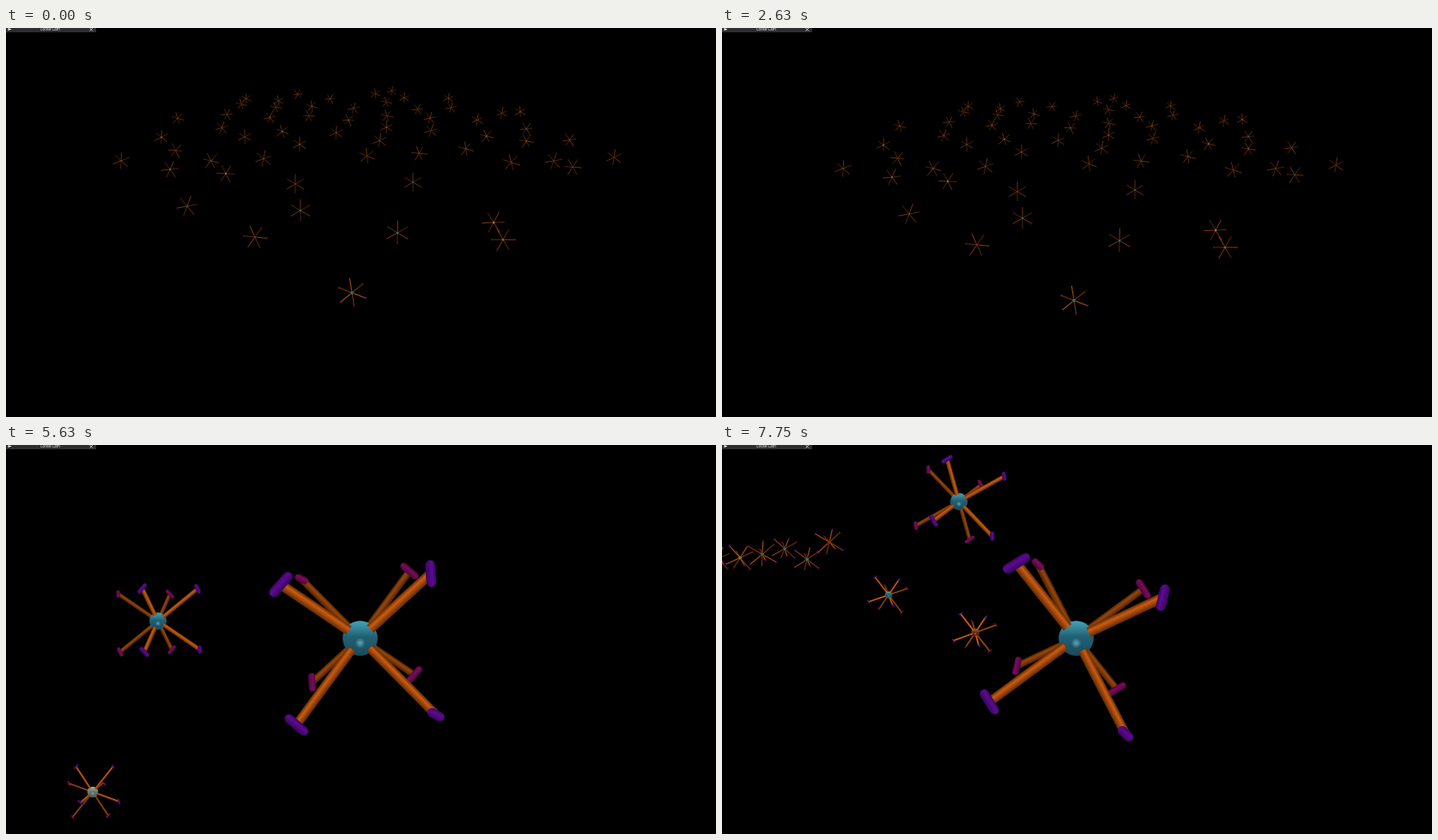
Recreate the animation shown at these times as an HTML page with a canvas. Size 827 by 454 pixels, loop 8000 ms.

```html
<!DOCTYPE html>
<html lang="en">
<head>
<meta charset="utf-8">
<title>Star field</title>
<style>
html, body { margin: 0; width: 100%; height: 100%; overflow: hidden; background: #000; }
canvas { display: block; }
</style>
</head>
<body>
<canvas id="stage" width="827" height="454"></canvas>
<script>
const ctx = document.getElementById('stage').getContext('2d');
const LOOP = 8000, TICK = 125, CUT = 5625, SWARM = 6000, RAD = Math.PI / 180;
const TEAL = '#338aa2', GREEN = '#3f8048', PALE = '#a3ad90', YELLOW = '#a8873a', RED = '#a0341c';
const BALLS = [TEAL, TEAL, RED, PALE, YELLOW, GREEN];

// Each diagonal carries two opposite arms, each ending in a crossbar
const DIAGONALS = [
  { arm: [1, 1, 1], bar: [1, 1, -2] },
  { arm: [-1, -1, 1], bar: [1, -1, 0] },
  { arm: [-1, 1, 1], bar: [1, 1, 0] },
  { arm: [1, -1, 1], bar: [0, 1, 1] }
];

// Nearest stars: place before the turn, place after it, roll
const NEAR = [
  [403, 309, 451, 261, -9], [456, 239, 561, 207, 1], [290, 244, 353, 309, -25],
  [568, 227, 629, 195, 28], [579, 247, 605, 260, -30], [211, 208, 278, 256, 20],
  [343, 213, 365, 235, 0], [474, 180, 528, 163, 0], [337, 182, 399, 194, 0],
  [256, 170, 324, 177, 33], [191, 165, 246, 185, 24], [638, 155, 647, 188, 20]
];

// Larger passing stars: x, y, arm length
const PASSING = [[18, 182, 24], [22, 277, 30], [129, 241, 27], [94, 269, 35], [300, 270, 23], [401, 314, 25]];

const mix = (a, b, k) => a + (b - a) * k;
const clamp = v => Math.max(0, Math.min(1, v));
const ramp = (t, from, to) => clamp((t - from) / (to - from));
const rnd = n => { const s = Math.sin(n * 12.9898 + 4.1) * 43758.5453; return s - Math.floor(s); };
const around = (n, mid, spread) => mid + (rnd(n) * 2 - 1) * spread;

function spin(x, y, deg) {
  const c = Math.cos(deg * RAD), s = Math.sin(deg * RAD);
  return [x * c - y * s, x * s + y * c];
}

function orient([x, y, z], [yaw, pitch, roll]) {
  const [x1, z1] = spin(x, z, yaw);
  const [y1, z2] = spin(y, z1, pitch);
  return [...spin(x1, y1, roll), z2];
}

function rod(x1, y1, x2, y2, w, light, dark, cap) {
  let color = light;
  if (w > 2) {
    const len = Math.hypot(x2 - x1, y2 - y1) || 1;
    const flip = x2 < x1 ? -1 : 1;
    const nx = (y2 - y1) / len * w / 2 * flip, ny = (x1 - x2) / len * w / 2 * flip;
    color = ctx.createLinearGradient(x1 + nx, y1 + ny, x1 - nx, y1 - ny);
    color.addColorStop(0, dark);
    color.addColorStop(0.35, light);
    color.addColorStop(1, dark);
  }
  ctx.lineWidth = w;
  ctx.lineCap = cap || 'butt';
  ctx.strokeStyle = color;
  ctx.beginPath();
  ctx.moveTo(x1, y1);
  ctx.lineTo(x2, y2);
  ctx.stroke();
}

function drawBall(x, y, r, color) {
  ctx.fillStyle = color;
  ctx.beginPath();
  ctx.arc(x, y, r, 0, 7);
  ctx.fill();
  if (r < 3) return;
  const shade = ctx.createLinearGradient(x, y - r, x, y + r);
  shade.addColorStop(0, 'rgba(110,215,235,.3)');
  shade.addColorStop(0.45, 'rgba(0,20,30,.35)');
  shade.addColorStop(1, 'rgba(0,10,20,.5)');
  ctx.fillStyle = shade;
  ctx.fill();
  const glow = ctx.createRadialGradient(x, y + r * .28, 0, x, y + r * .28, r * .3);
  glow.addColorStop(0, 'rgba(140,215,230,.6)');
  glow.addColorStop(1, 'rgba(140,215,230,0)');
  ctx.fillStyle = glow;
  ctx.fill();
}

function drawArm(x, y, r, { tip: [px, py, pz], bar, near }) {
  const front = pz > 0;
  const len = Math.hypot(px, py);
  if (len < r * .15) return;
  const w = Math.max(.8, r * (r > 45 ? .077 : .062) * near);
  const k = Math.min(.8, (front ? .13 : .05) * r / len);
  rod(x + px * k, y + py * k, x + px, y + py, w,
    front ? '#cc5c10' : '#984609', front ? '#612b06' : '#4e2205');
  if (r < 10) return;
  const [bx, by] = bar;
  rod(x + px - bx, y + py - by, x + px + bx, y + py + by, w * (r < 40 ? .85 : 1),
    front ? '#5c0a92' : '#7c0a5e', front ? '#38065c' : '#4a0838', 'round');
}

// A ball with eight arms; lens is the viewing distance in half edges
function drawStar(x, y, r, pose, color, lens = 20) {
  const half = r / Math.sqrt(3);
  const arms = [];
  for (const { arm, bar } of DIAGONALS) {
    for (const side of [-1, 1]) {
      const [px, py, pz] = orient(arm.map(v => v * side), pose);
      const near = 1 / (1 - pz / lens);
      const barScale = r * .078 * near / Math.hypot(...bar);
      arms.push({
        near,
        tip: [px * half * near, py * half * near, pz],
        bar: orient(bar, pose).map(v => v * barScale)
      });
    }
  }
  arms.sort((a, b) => a.tip[2] - b.tip[2]);
  ctx.globalAlpha = clamp(.42 + r / 50);
  arms.slice(0, 4).forEach(a => drawArm(x, y, r, a));
  if (r > 20) drawBall(x, y, r * .165, color);
  arms.slice(4).forEach(a => drawArm(x, y, r, a));
  if (r <= 20) drawBall(x, y, Math.max(.7, r * .11), color);
  ctx.globalAlpha = 1;
}

// Ground disc of radius 1, seen from outside and above
const toScreen = (gx, gz) => [412 + gx * 550 / (gz + 2), 358 / (gz + 2) - 48];
const sizeAt = y => (y + 48) * .05;

function drawField(t) {
  const turn = ramp(t, 2630, 4130) + Math.max(0, t - 4130) / 6000;
  const pan = ramp(t, 1250, 2250) - ramp(t, 2630, 4130);
  const dx = 7 * pan, dy = 10 * pan - ramp(t, 0, 1250) * (1 - turn);

  // Even spiral over the far part of the disc
  for (let i = 0; i < 70; i++) {
    const radius = Math.sqrt((i + .5) / 70);
    const angle = i * 137.508 + around(i, 0, 6);
    if (radius * Math.sin(angle * RAD) < -.3) continue;
    const [gx, gz] = spin(radius, 0, angle + 16 * turn);
    const [x, y] = toScreen(gx, gz);
    const pose = [around(i + 100, 45, 18), around(i + 200, 32, 8), around(i + 300, 0, 30)];
    drawStar(x + dx, y + dy, sizeAt(y), pose, BALLS[i % 6]);
  }
  NEAR.forEach(([x0, y0, x1, y1, roll], i) => {
    const x = mix(x0, x1, turn), y = mix(y0, y1, turn);
    const grow = i ? 1 : 1 + .9 * turn; // the first one comes towards the viewer
    drawStar(x + dx, y + dy, sizeAt(y) * grow, [45 - 20 * turn, 34 - 10 * turn, roll], BALLS[i % 6]);
  });
}

function drawSwarm(t) {
  const k = (t - 6380) / 1370;
  for (let i = 0; i < 11; i++) {
    const pose = [around(i, 28, 8), around(i + 20, 12, 8), around(i + 40, 0, 10)];
    drawStar(50 + i * 26 - 185 * k, around(i + 60, 229, 13) - 103 * k,
      around(i + 80, 14, 2) + 4 * k, pose, BALLS[(i + 4) % 6]);
  }
  PASSING.forEach(([x, y, r], i) => {
    const drift = mix(-190, -106, clamp(x / 300));
    const pose = [around(i + 7, 27, 4), around(i + 27, 12, 6), 14 * k];
    drawStar(x + drift * k, y - 95 * k, r + 3 * k, pose, BALLS[(i + 3) % 6]);
  });
  drawStar(mix(382, 276, k), mix(163, 66, k), mix(47, 61, k),
    [mix(-13, -18, k), mix(3, 11, k), 12 * k], TEAL);
}

function drawCloseUp(t) {
  if (t < SWARM) {
    drawStar(177, 205.5, 60, [-26, 2, -2], TEAL);
    drawStar(101, 405, 38, [-17, 23, -8], PALE);
  } else {
    drawSwarm(t);
  }
  const roll = 10.1 * ramp(t, CUT, 6380) + 7.3 * ramp(t, 6380, 7750);
  drawStar(412.5, 225.5, 123, [0, -11, roll - 4.2], TEAL, 6.2);
}

function drawBar() {
  ctx.save();
  ctx.beginPath();
  ctx.rect(0, 0, 105, 5);
  ctx.clip();
  ctx.fillStyle = '#2e2e2e';
  ctx.fillRect(0, 0, 105, 5);
  ctx.fillStyle = '#fff';
  ctx.beginPath();
  ctx.moveTo(2.5, 0);
  ctx.lineTo(6.5, 1.4);
  ctx.lineTo(2.5, 3);
  ctx.fill();
  ctx.font = '4.4px "Open Sans", sans-serif';
  ctx.textAlign = 'center';
  ctx.fillText('Loose Cam', 51.5, 3.4);
  rod(97.5, 0, 101, 3.5, .8, '#ddd');
  rod(101, 0, 97.5, 3.5, .8, '#ddd');
  ctx.restore();
}

function draw(t) {
  ctx.fillStyle = '#000';
  ctx.fillRect(0, 0, 827, 454);
  if (t < CUT) drawField(t);
  else drawCloseUp(t);
  drawBar();
}

const start = performance.now();
let shown = -1;

function tick() {
  const t = (performance.now() - start) % LOOP;
  const step = Math.floor(t / TICK) * TICK;
  if (step !== shown) draw(shown = step);
  requestAnimationFrame(tick);
}
tick();
</script>
</body>
</html>
```
